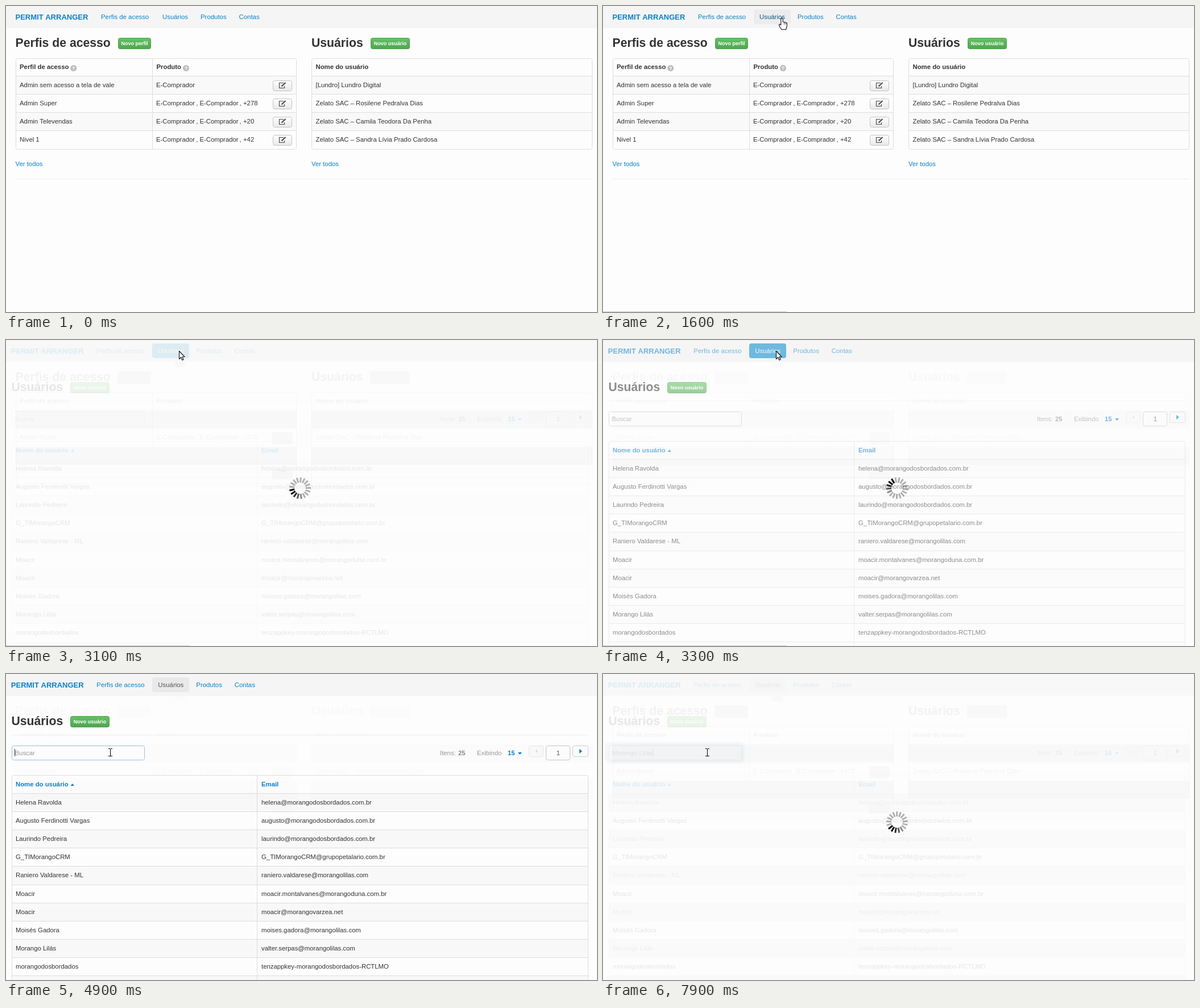
An HTML page with a canvas for the animation above (8000 ms loop, 1039 by 539 pixels).

```html
<!DOCTYPE html>
<html lang="pt-BR">
<head>
<meta charset="utf-8">
<title>Painel de usuários</title>
<style>
html, body { margin: 0; width: 100%; height: 100%; overflow: hidden; background: #fdfdfd; }
canvas { display: block; width: 1039px; height: 539px; }
</style>
</head>
<body>
<canvas id="stage"></canvas>
<script>
const W = 1039, H = 539, LOOP = 8000, STEP = 100;
const canvas = document.getElementById('stage');
const ctx = canvas.getContext('2d');
const dpr = window.devicePixelRatio || 1;
canvas.width = W * dpr;
canvas.height = H * dpr;

const BLUE = '#0a81c8', DARK = '#333', LINE = '#ddd', PAGE = '#fdfdfd';
const SIZE = 11.35, VEIL = .89;
const APP = 'PERMIT ARRANGER', SHOP = 'E-Comprador', QUERY = 'Morango Lilás';

const profiles = [
  ['Admin sem acesso a tela de vale', ''],
  ['Admin Super', '+278'],
  ['Admin Televendas', '+20'],
  ['Nivel 1', '+42']
];
const staff = [
  '[Lundro] Lundro Digital',
  'Zelato SAC – Rosilene Pedralva Dias',
  'Zelato SAC – Camila Teodora Da Penha',
  'Zelato SAC – Sandra Lívia Prado Cardosa'
];
const users = [
  ['Helena Ravolda', 'helena@morangodosbordados.com.br'],
  ['Augusto Ferdinotti Vargas', 'augusto@morangodosbordados.com.br'],
  ['Laurindo Pedreira', 'laurindo@morangodosbordados.com.br'],
  ['G_TIMorangoCRM', 'G_TIMorangoCRM@grupopetalario.com.br'],
  ['Raniero Valdarese - ML', 'raniero.valdarese@morangolilas.com'],
  ['Moacir', 'moacir.montalvanes@morangoduna.com.br'],
  ['Moacir', 'moacir@morangovarzea.net'],
  ['Moisés Gadora', 'moises.gadora@morangolilas.com'],
  [QUERY, 'valter.serpas@morangolilas.com'],
  ['morangodosbordados', 'tenzappkey-morangodosbordados-RCTLMO']
];
const nav = [
  ['Perfis de acesso', 167, 86],
  ['Usuários', 275, 44],
  ['Produtos', 342, 45],
  ['Contas', 409.5, 36]
];

// time, x, y of the pointer tip
const path = [
  [200, 926, 20], [300, 800, 6], [400, 667, 21], [500, 667, 21],
  [800, 520, 8], [1000, 430, 16], [1200, 365, 20], [1400, 317, 22],
  [1500, 317, 22], [1600, 314, 21], [1700, 300, 27], [1800, 300, 27],
  [1900, 292, 24], [2100, 285, 14], [2300, 315, 27], [2400, 304, 19],
  [3600, 304, 19], [3900, 211, 127], [4200, 192, 140], [4500, 183, 138]
];
// time, letters typed so far
const typing = [
  [5500, 1], [5700, 2], [5800, 3], [6000, 4], [6100, 5], [6200, 6],
  [6400, 7], [6500, 8], [6700, 9], [6800, 10], [7000, 12], [7200, 13]
];

function text(s, x, y, color = DARK, size = SIZE, bold = false, align = 'left') {
  ctx.font = `${bold ? 'bold ' : ''}${size}px Arial, "Liberation Sans", sans-serif`;
  ctx.textAlign = align;
  ctx.fillStyle = color;
  ctx.fillText(s, x, y);
}
const bold = (s, x, y, color, size) => text(s, x, y, color, size, true);

function rect(x, y, w, h, color) {
  ctx.fillStyle = color;
  ctx.fillRect(x, y, w, h);
}

function box(x, y, w, h, r, fill, stroke) {
  ctx.beginPath();
  ctx.roundRect(x, y, w, h, r);
  if (fill) { ctx.fillStyle = fill; ctx.fill(); }
  if (stroke) { ctx.strokeStyle = stroke; ctx.lineWidth = 1; ctx.stroke(); }
}

function shape(points, fill, stroke, width = 1) {
  ctx.beginPath();
  points.forEach(([x, y]) => ctx.lineTo(x, y));
  ctx.closePath();
  if (fill) { ctx.fillStyle = fill; ctx.fill(); }
  if (stroke) {
    ctx.strokeStyle = stroke;
    ctx.lineWidth = width;
    ctx.lineJoin = 'round';
    ctx.stroke();
  }
}

function shade(y, h, top, bottom) {
  const g = ctx.createLinearGradient(0, y, 0, y + h);
  g.addColorStop(0, top);
  g.addColorStop(1, bottom);
  return g;
}

function greenButton(label, x, y, w) {
  box(x + .5, y + .5, w - 1, 19, 3, shade(y, 20, '#62c462', '#51a351'), '#51a351');
  text(label, x + w / 2, y + 13, '#fff', 9, true, 'center');
}

function greyButton(x, y, w, h) {
  box(x + .5, y + .5, w - 1, h - 1, 3, shade(y, h, '#fff', '#e8e8e8'), '#c4c4c4');
}

function editButton(y) {
  greyButton(469, y, 34, 19);
  ctx.strokeStyle = '#444';
  ctx.lineWidth = 1.1;
  ctx.beginPath();
  ctx.moveTo(488, y + 4.5);
  ctx.lineTo(480.5, y + 4.5);
  ctx.lineTo(480.5, y + 13.5);
  ctx.lineTo(489.5, y + 13.5);
  ctx.lineTo(489.5, y + 10);
  ctx.stroke();
  ctx.lineWidth = 2;
  ctx.beginPath();
  ctx.moveTo(484.5, y + 10.5);
  ctx.lineTo(491.5, y + 4);
  ctx.stroke();
}

function help(x, y) {
  ctx.beginPath();
  ctx.arc(x, y, 5.5, 0, 7);
  ctx.fillStyle = '#bdbdbd';
  ctx.fill();
  text('?', x, y + 3.2, '#fff', 9, true, 'center');
}

function header(dx, pill, pillColor, pillText) {
  rect(0, 0, W, 39, '#f5f5f5');
  bold(APP, 16.5 + dx, 24, BLUE, 13);
  nav.forEach(([label, x, w], i) => {
    if (i === pill) box(Math.round(x + dx - 10), 6, w + 21, 26, 4, pillColor);
    text(label, x + dx, 23, i === pill ? pillText : BLUE, 11.4);
  });
}

function smallTable(x, w) {
  box(x + .5, 92.5, w, 160, 3, PAGE, LINE);
  for (let i = 0; i < 4; i++) {
    if (i % 2 === 0) rect(x + 1, 124 + 32 * i, w - 1, 32, '#f9f9f9');
    rect(x, 123 + 32 * i, w, 1, LINE);
  }
}

function dashboard(hover) {
  rect(0, 0, W, H, PAGE);
  header(0, hover, '#ececec', '#0b5582');
  bold('Perfis de acesso', 16.5, 72, DARK, 21.2);
  greenButton('Novo perfil', 197, 56, 58);
  smallTable(17, 493);
  rect(257, 92, 1, 161, LINE);
  bold('Perfil de acesso', 24, 111);
  help(118.8, 109.5);
  bold('Produto', 264.5, 111);
  help(316.5, 109.5);
  profiles.forEach(([name, more], i) => {
    const y = 143 + 32 * i;
    text(name, 24, y);
    text(SHOP, 264, y);
    if (more) {
      text(',', 334.2, y);
      text(SHOP, 340.5, y);
      text(',', 410.5, y);
      text(more, 417, y);
    }
    editButton(y - 12);
  });
  bold('Usuários', 537, 72, DARK, 21.2);
  greenButton('Novo usuário', 641, 56, 69);
  smallTable(537, 493);
  bold('Nome do usuário', 544.5, 111);
  staff.forEach((s, i) => text(s, 544.5, 143 + 32 * i));
  text('Ver todos', 16.5, 282, BLUE);
  text('Ver todos', 537, 282, BLUE);
  rect(17, 304, 1014, 1, '#eee');
}

// faint afterimage of the previous page
function ghost(a) {
  const strong = `rgba(0,0,0,${a})`, soft = `rgba(0,0,0,${a * .45})`;
  bold('Perfis de acesso', 16.5, 72, strong, 21.2);
  bold('Usuários', 537, 72, strong, 21.2);
  box(196, 55, 59, 22, 3, soft);
  box(640, 55, 70, 22, 3, soft);
  box(296, 39, 20, 9, 3, soft);
  for (const x of [17, 537]) {
    box(x + .5, 92.5, 493, 160, 3, null, soft);
    rect(x, 124, 494, 32, soft);
    rect(x, 188, 494, 32, soft);
  }
  rect(257, 92, 1, 96, soft);
  bold('Perfil de acesso', 24, 111, strong);
  bold('Produto', 264.5, 111, strong);
  bold('Nome do usuário', 544.5, 111, strong);
  text('Admin Super', 24, 175, strong);
  text(SHOP + ' ,', 264, 175, strong);
  text(SHOP + ' ,', 340.5, 175, strong);
  text('+278', 417, 175, strong);
  text(staff[1], 544.5, 175, strong);
  box(468, 162, 36, 22, 3, soft);
  box(468, 228, 36, 18, 3, soft);
}

function searchField(t) {
  const focused = t >= 4900, full = t >= 5000;
  if (full) {
    ctx.save();
    ctx.shadowColor = 'rgba(82,168,236,.75)';
    ctx.shadowBlur = 7 * dpr;
    box(10.5, 126.5, 233, 25, 3, '#fff', '#6cb3ea');
    ctx.restore();
  }
  box(10.5, 126.5, 233, 25, 3, '#fefefe', full ? '#62aee8' : focused ? '#9fc5e0' : '#c8c8c8');
  const count = typing.reduce((n, [at, k]) => t >= at ? k : n, 0);
  const typed = QUERY.slice(0, count);
  text(typed || 'Buscar', 15.5, 143, typed ? '#555' : '#999');
  if (focused) rect(Math.round(15.3 + (typed ? ctx.measureText(typed).width : 0)), 132, 1, 13, '#333');
}

function pager() {
  text('Itens:', 763, 143, '#999');
  bold('25', 795, 143, '#888');
  text('Exibindo', 828, 143, '#999');
  bold('15', 882, 143, BLUE);
  shape([[900, 138], [907, 138], [903.5, 142]], BLUE);
  box(919.5, 126.5, 25, 19, 3, '#fafafa', '#e8e8e8');
  shape([[934, 133], [934, 139], [930.5, 136]], '#ddd');
  box(949.5, 126.5, 42, 25, 3, '#fefefe', '#c8c8c8');
  text('1', 971, 143, '#555', SIZE, false, 'center');
  box(996.5, 126.5, 27, 19, 3, '#fdfdfd', '#d0d0d0');
  shape([[1008, 132], [1008, 140], [1013, 136]], BLUE);
}

const rowTop = i => Math.round(210 + 32.1 * i);

function userPage(t, veil) {
  rect(0, 0, W, H, PAGE);
  if (t < 4900) header(-7.7, 1, '#0088cc', '#fff');
  else header(-7.7, 1, '#e9e9e9', '#555');
  bold('Usuários', 9.5, 90, DARK, 21.2);
  greenButton('Novo usuário', 113, 74, 69);
  rect(10, 107, 1014, 1, '#eee');
  searchField(t);
  pager();
  box(10.5, 178.5, 1013, 400, 3, PAGE, LINE);
  for (let i = 0; i <= users.length; i++) {
    const y = rowTop(i);
    if (i % 2 === 0) rect(11, y + 1, 1012, 32, '#f8f8f8');
    rect(10, y, 1014, 1, LINE);
    if (i === users.length) break;
    text(users[i][0], 17, y + 20);
    text(users[i][1], 449, y + 20);
  }
  rect(441, 179, 1, H - 179, LINE);
  bold('Nome do usuário', 17, 198, BLUE);
  shape([[113.5, 197], [120, 197], [116.8, 193]], BLUE);
  bold('Email', 449, 198, BLUE);

  if (!veil) {
    ghost(.018);
    return;
  }
  rect(0, 0, W, H, `rgba(253,253,253,${veil})`);
  rect(0, 0, W, 38, 'rgba(0,0,0,.016)');
  ghost(.05 * veil);
  if (t > 7000) {
    box(3, 120, 246, 38, 8, `rgba(0,0,0,${.02 * veil})`);
    for (let i = 0; i <= users.length; i += 2)
      rect(10, rowTop(i), 1014, 32, `rgba(247,247,247,${.5 * veil})`);
  }
  spinner(t);
}

function spinner(t) {
  const lines = 17, turn = Math.PI * 2;
  const head = t > 7000 ? 142 + (t - 7900) * .36 : 168 + (t - 3100) * .36;
  ctx.lineWidth = 3;
  ctx.lineCap = 'butt';
  for (let i = 0; i < lines; i++) {
    const a = head / 360 * turn - i / lines * turn;
    const alpha = Math.max(.3, 1 - Math.max(0, i - 1) * .18);
    ctx.strokeStyle = `rgba(0,0,0,${alpha})`;
    ctx.beginPath();
    ctx.moveTo(517 + 10 * Math.cos(a), 261 + 10 * Math.sin(a));
    ctx.lineTo(517 + 19 * Math.cos(a), 261 + 19 * Math.sin(a));
    ctx.stroke();
  }
}

function pointer(t) {
  const next = path.findIndex(p => p[0] > t);
  if (next === 0) return null;
  if (next < 0) return path[path.length - 1].slice(1);
  const [t0, x0, y0] = path[next - 1], [t1, x1, y1] = path[next];
  const k = (t - t0) / (t1 - t0);
  return [x0 + (x1 - x0) * k, y0 + (y1 - y0) * k];
}

const arrow = [[0, 0], [0, 14], [3.2, 11], [5.4, 16], [7.6, 15], [5.4, 10.3], [9.5, 10]];
const hand = [[-1.7, 12], [-1.7, 1], [0, -.5], [1.7, 1], [1.7, 6.5], [4, 6.7], [6.4, 7.6], [8.6, 8.6],
  [9.2, 11], [8.6, 15], [7, 20], [-.5, 20], [-3.5, 15.5], [-5.2, 11.8], [-3.8, 10.4]];

function drawPointer([x, y], kind) {
  x = Math.round(x);
  y = Math.round(y);
  if (kind === 'beam') {
    rect(x, y - 6, 1, 13, '#000');
    for (const dy of [-7, 6]) {
      rect(x - 3, y + dy, 3, 1, '#000');
      rect(x + 1, y + dy, 3, 1, '#000');
    }
    return;
  }
  ctx.save();
  ctx.translate(x + .5, y + .5);
  shape(kind === 'hand' ? hand : arrow, '#fff', '#111', 1.1);
  if (kind === 'hand') {
    rect(3.6, 7, .8, 4, '#111');
    rect(6.2, 8, .8, 3.4, '#111');
  }
  ctx.restore();
}

function veilAt(t) {
  if (t >= 7700) return VEIL * (t - 7600) / 300;
  return t < 3300 ? VEIL : t < 3400 ? VEIL / 2 : 0;
}

function draw(time) {
  const t = Math.floor(time % LOOP / STEP) * STEP;
  ctx.setTransform(dpr, 0, 0, dpr, 0, 0);
  const pos = pointer(t);
  let kind = 'arrow', status = t >= 3100 && t < 4100;
  if (t < 3100) {
    const hover = pos ? nav.findIndex(([, x, w]) => pos[0] > x - 10 && pos[0] < x + w + 10) : -1;
    dashboard(hover);
    status = hover >= 0;
    if (status && t < 2700) kind = 'hand';
  } else {
    userPage(t, veilAt(t));
    if (t >= 4000) kind = 'beam';
  }
  if (status) rect(0, 538, 323, 1, '#ccc');
  if (pos) drawPointer(pos, kind);
}

let start;
function frame(now) {
  start ??= now;
  draw(Math.max(0, now - start));
  requestAnimationFrame(frame);
}
draw(0);
requestAnimationFrame(frame);
</script>
</body>
</html>
```
